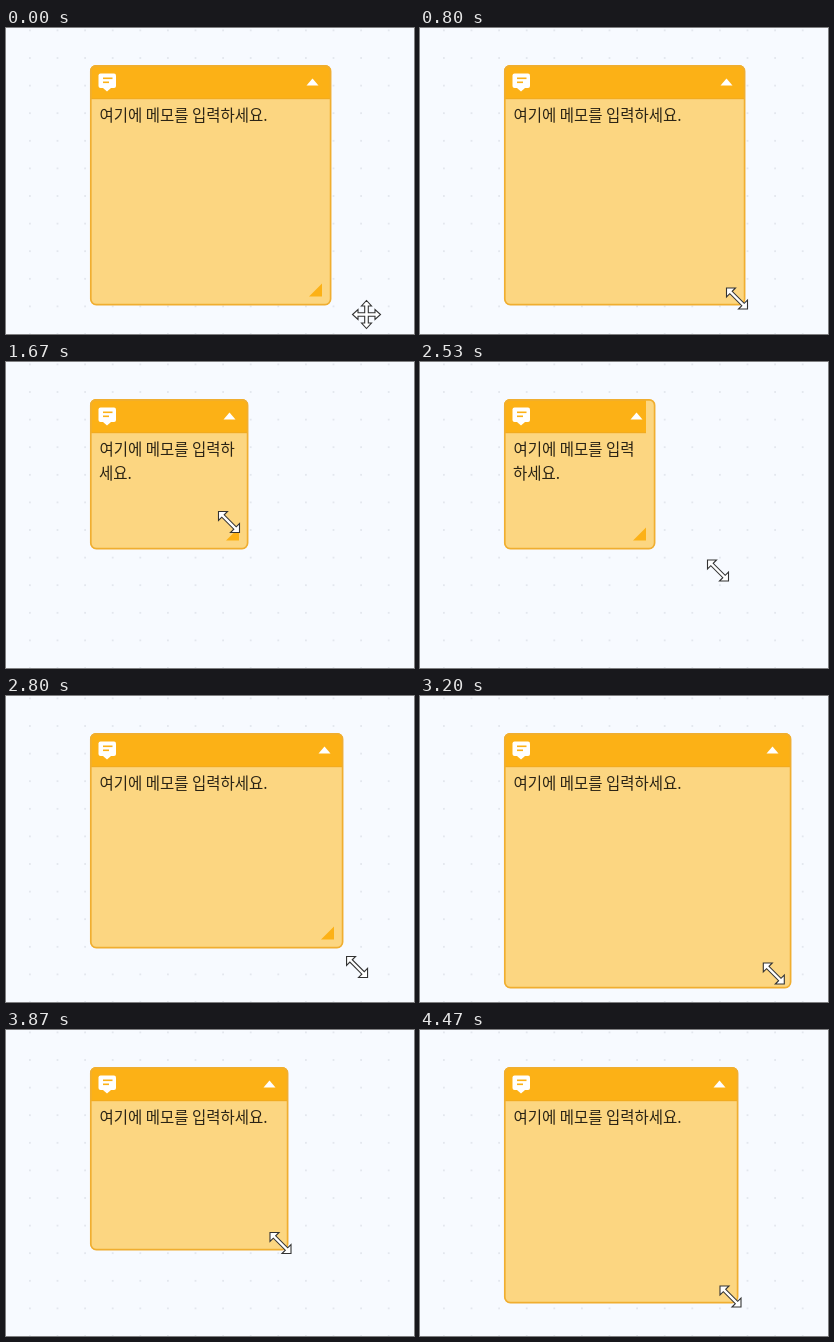
These frames come from a looping animation (408 by 306 pixels, 4940 ms). An HTML page with a canvas:

```html
<!DOCTYPE html>
<html lang="ko">
<head>
<meta charset="utf-8">
<style>
html, body { margin: 0; width: 100%; height: 100%; overflow: hidden; background: #f7faff; }
canvas { display: block; width: 408px; height: 306px; }
</style>
</head>
<body>
<canvas id="stage" width="408" height="306"></canvas>
<script>
const ctx = document.getElementById('stage').getContext('2d');
const LOOP = 4940, TICK = 1000 / 15;
const LEFT = 84, TOP = 37, MIN_WIDTH = 151, MIN_HEIGHT = 150;
const DRAG_START = 12, LAG = 2, GRID = 27.6;
const ORANGE = '#fcb116', BODY = '#fcd681', EDGE = '#f0ae30';
const MEMO = '여기에 메모를 입력하세요.';

const smooth = k => k * k * (3 - 2 * k);
const easeIn = k => k ** 3;
const easeOut = k => 1 - (1 - k) ** 2;

// Pointer gestures in ticks; the pointer rests between them
const START = { x: 360.5, y: 286.5 };
const gestures = [
  { from: 1, to: 9, x: 317, y: 270.5, ease: smooth },
  { from: 16, to: 25, x: 223, y: 160, ease: smooth },
  { from: 35, to: 38, x: 298, y: 208.5, ease: easeIn },
  { from: 38, to: 45, x: 363, y: 285, ease: easeOut },
  { from: 46, to: 56, x: 274.5, y: 213, ease: smooth },
  { from: 58, to: 65, x: 310.5, y: 266.5, ease: smooth }
];

// Both pointers are one outline repeated by rotation
function rotated(part, turns) {
  return Array.from({ length: turns }, (_, i) => {
    const c = Math.cos(i * 2 * Math.PI / turns), s = Math.sin(i * 2 * Math.PI / turns);
    return part.map(([x, y]) => [x * c - y * s, x * s + y * c]);
  }).flat();
}
const resizeShape = rotated([[-10.5, -1.5], [-10.5, -10.5], [-1.5, -10.5], [-4.8, -7.2], [7.2, 4.8]], 2);
const moveShape = rotated([[-1.8, -1.8], [-1.8, -8.5], [-5, -8.5], [0, -14], [5, -8.5], [1.8, -8.5]], 4);

function pointerAt(tick) {
  let { x, y } = START;
  for (const g of gestures) {
    const k = g.ease(Math.min(1, Math.max(0, (tick - g.from) / (g.to - g.from))));
    x += (g.x - x) * k;
    y += (g.y - y) * k;
  }
  return { x, y };
}

function rect(x, y, w, h, fill) {
  ctx.fillStyle = fill;
  ctx.fillRect(x, y, w, h);
}

function roundRect(x, y, w, h, r) {
  ctx.beginPath();
  ctx.roundRect(x, y, w, h, r);
}

function polygon(points, x, y, fill, stroke) {
  ctx.beginPath();
  for (const [px, py] of points) ctx.lineTo(x + px, y + py);
  ctx.closePath();
  ctx.fillStyle = fill;
  ctx.fill();
  if (!stroke) return;
  ctx.strokeStyle = stroke;
  ctx.lineWidth = 1.1;
  ctx.stroke();
}

function drawGrid() {
  rect(0, 0, 408, 306, '#f7faff');
  for (let x = 23; x < 408; x += GRID)
    for (let y = 1.5; y < 306; y += GRID) rect(x, y, 1.8, 1.8, '#e3e7ee');
}

function drawIcon() {
  roundRect(92.5, 45.5, 17.5, 14.5, 2);
  ctx.fillStyle = '#fff';
  ctx.fill();
  polygon([[-4, 0], [4, 0], [0, 3.5]], 101, 60, '#fff');
  rect(97, 49.5, 9.5, 1.6, ORANGE);
  rect(97, 53.5, 6, 1.6, ORANGE);
}

function drawText(right) {
  ctx.font = '300 15.5px "Noto Sans CJK KR", "Noto Sans CJK", sans-serif';
  ctx.fillStyle = '#2b2415';
  let end = MEMO.length;
  while (93.5 + ctx.measureText(MEMO.slice(0, end)).width > right - 10) end--;
  ctx.fillText(MEMO.slice(0, end), 93.5, 92.5);
  ctx.fillText(MEMO.slice(end), 93, 116.5);
}

function drawNote(w, h, showHandle) {
  const right = LEFT + w, bottom = TOP + h;
  // The header paints late while the note sits at its smallest width
  const headerWidth = w === MIN_WIDTH ? w - 9 : w;
  roundRect(LEFT, TOP, w, h, 6);
  ctx.save();
  ctx.clip();
  rect(LEFT, TOP, w, h, BODY);
  rect(LEFT, TOP, headerWidth, 34, ORANGE);
  rect(LEFT, 70, headerWidth, 1.2, '#f2ab1e');
  ctx.restore();
  roundRect(LEFT + 0.8, TOP + 0.8, w - 1.2, h - 1.2, 5.5);
  ctx.strokeStyle = EDGE;
  ctx.lineWidth = 1.7;
  ctx.stroke();

  drawIcon();
  polygon([[-6, 3.5], [0, -3.5], [6, 3.5]], right - 18.5, 54, '#fff');
  if (showHandle) polygon([[0, -13], [0, 0], [-13, 0]], right - 9, bottom - 8.5, ORANGE);
  drawText(right);
}

function draw(now) {
  const tick = Math.floor((now % LOOP + 4) / TICK);
  const pointer = pointerAt(tick);
  const drag = pointerAt(Math.max(DRAG_START, tick - LAG));
  const w = Math.max(MIN_WIDTH, Math.round(drag.x + 7.5 - LEFT));
  const h = Math.max(MIN_HEIGHT, Math.round(drag.y + 6.5 - TOP));
  const near = Math.max(Math.abs(LEFT + w - pointer.x), Math.abs(TOP + h - pointer.y)) < 18;

  drawGrid();
  drawNote(w, h, !near);
  polygon(near || tick > DRAG_START ? resizeShape : moveShape, pointer.x, pointer.y, '#fff', '#333');
  requestAnimationFrame(draw);
}
requestAnimationFrame(draw);
</script>
</body>
</html>
```
